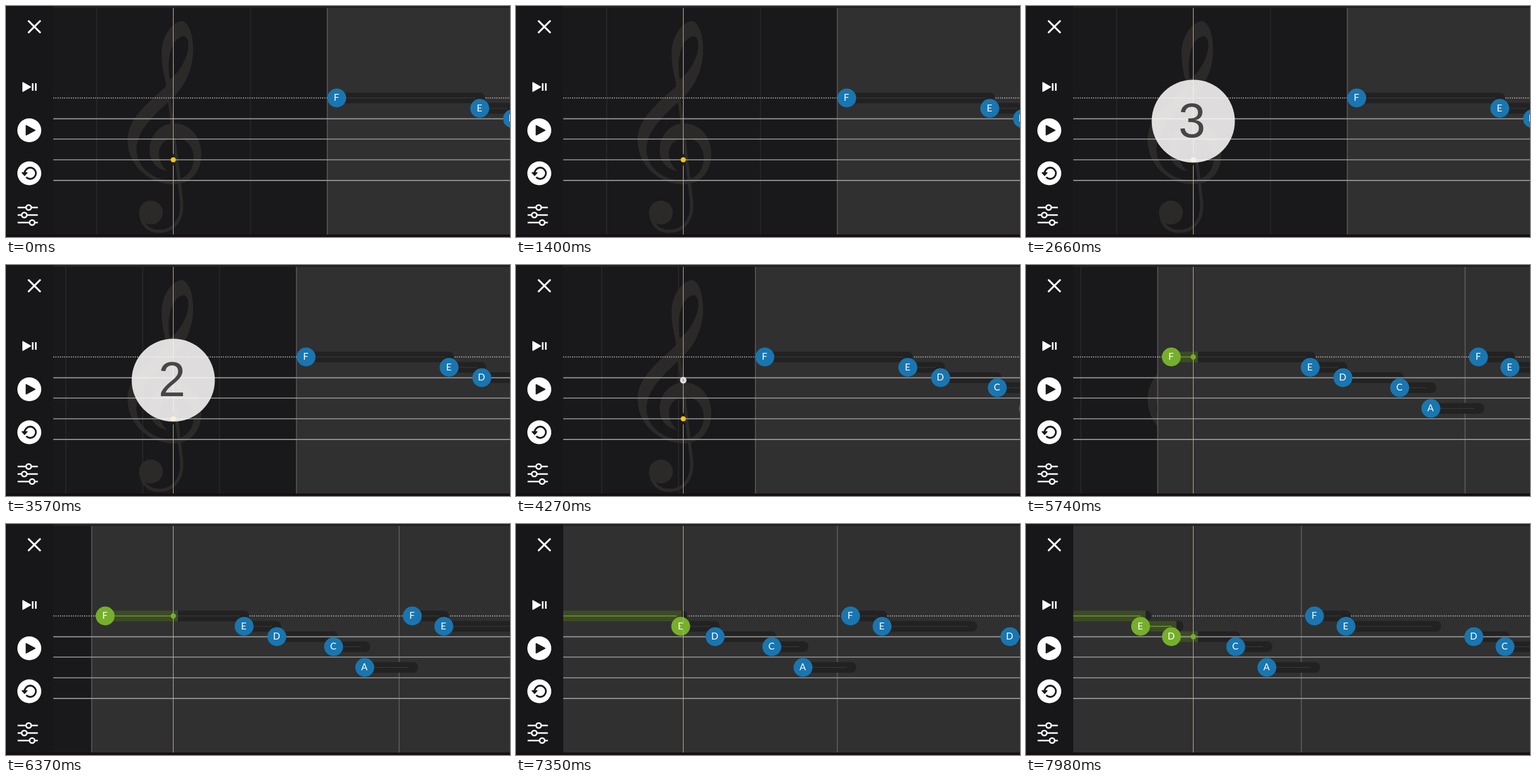
Write an HTML page with a canvas that moves like this. It is 800 px wide and 368 px high and loops after 8 s.

```html
<!DOCTYPE html>
<html lang="en">
<head>
<meta charset="utf-8">
<title>Sing along</title>
<style>
  html, body { margin: 0; width: 100%; height: 100%; overflow: hidden; background: #18181a; }
  canvas { display: block; }
</style>
</head>
<body>
<canvas id="stage" width="800" height="368"></canvas>
<script>
const ctx = document.getElementById('stage').getContext('2d');
const LOOP = 8000, STEP = 70;
const LEFT = 75, TOP = 3, BOTTOM = 364;
const HEAD_X = 265, BAR = 488, BEAT = 122;
const START = 3151, SPEED = 0.1162, BEAT_MS = BEAT / SPEED;
const BLUE = '#1976b0', GREEN = '#76af2b', WHITE = '#fff', DARK = '#19191b';
const PITCH = { F: 146.5, E: 163, D: 179.5, C: 195.5, A: 228.5 };

// x and end are measured from the first bar line; from and to mark the sung part
const notes = [
  { name: 'F', x: 15, end: 250, from: 21.5, to: 233 },
  { name: 'E', x: 242, end: 301, from: 233, to: 282 },
  { name: 'D', x: 294, end: 391, from: 282, to: 372 },
  { name: 'C', x: 384, end: 442 },
  { name: 'A', x: 433.5, end: 518 },
  { name: 'F', x: 509, end: 567 },
  { name: 'E', x: 559, end: 710 },
  { name: 'D', x: 762, end: 819 },
  { name: 'C', x: 811.5, end: 900 }
];

const clef = new Path2D(`M279 24C290 26 297 45 297 70C297 100 285 125 267 144
  C240 170 208 195 207 228C207 256 232 278 264 278C285 277 298 262 298 242
  C298 226 288 211 270 210C256 210 246 217 243 230C241 242 246 254 256 263
  C240 260 228 248 228 230C228 206 244 187 268 187C292 188 310 208 310 236
  C310 262 295 284 266 284C228 284 194 255 193 215C192 180 225 155 255 127
  C251 110 247 95 247 75C247 50 262 26 279 24Z
  M281 48C264 51 254 82 260 117C282 101 294 68 288 53C286 49 284 48 281 48Z`);
const stem = new Path2D('M256 122L272 255L278 306C283 340 266 359 243 359C226 359 214 347 214 330');

function smooth(a, b, v) {
  const u = Math.min(1, Math.max(0, (v - a) / (b - a)));
  return u * u * (3 - 2 * u);
}

function rect(x, y, w, h, color) {
  ctx.fillStyle = color;
  ctx.fillRect(x, y, w, h);
}

function disc(x, y, r, color) {
  ctx.fillStyle = color;
  ctx.beginPath();
  ctx.arc(x, y, r, 0, 7);
  ctx.fill();
}

function line(x1, y1, x2, y2, color, width = 1) {
  ctx.strokeStyle = color;
  ctx.lineWidth = width;
  ctx.beginPath();
  ctx.moveTo(x1, y1);
  ctx.lineTo(x2, y2);
  ctx.stroke();
}

function triangle(x1, y1, x2, y2, x3, y3, color) {
  ctx.fillStyle = ctx.strokeStyle = color;
  ctx.lineWidth = 1.5;
  ctx.lineJoin = 'round';
  ctx.beginPath();
  ctx.moveTo(x1, y1);
  ctx.lineTo(x2, y2);
  ctx.lineTo(x3, y3);
  ctx.closePath();
  ctx.fill();
  ctx.stroke();
}

function drawClef() {
  ctx.fillStyle = ctx.strokeStyle = '#2c2a29';
  ctx.lineWidth = 5;
  ctx.fill(clef, 'evenodd');
  ctx.stroke(stem);
  disc(230, 329, 19, '#2c2a29');
}

function drawBackground(bar) {
  rect(0, 0, 800, 368, DARK);
  for (let k = 1; k < 4; k++) rect(Math.round(bar - k * BEAT) - 0.5, TOP, 1, BOTTOM - TOP, '#313133');
  drawClef();
  rect(bar, TOP, 800 - bar, BOTTOM - TOP, '#303030');
  for (const x of [bar, bar + BAR]) rect(Math.round(x) - 0.5, TOP, 1, BOTTOM - TOP, '#757575');
  rect(LEFT, 0, 725, TOP, '#222223');
  rect(0, BOTTOM, 800, 4, '#170f12');
}

function drawTail(n, bar, now) {
  const y = PITCH[n.name], x = bar + n.x, end = bar + n.end;
  ctx.fillStyle = '#222223';
  ctx.beginPath();
  ctx.roundRect(x, y - 8.5, end - x, 17, [0, 8, 8, 0]);
  ctx.fill();
  line(x, y, end - 15, y, '#39393a');
  if (now > n.from) {
    const a = bar + n.from, b = bar + Math.min(now, n.to);
    rect(a, y - 8.5, b + 8 - a, 17, '#3c4b24');
    line(a, y, b, y, '#6d9933', 1.5);
  }
}

function drawHead(n, bar, now) {
  const y = PITCH[n.name], sung = now > n.from;
  const shift = sung ? (n.from - n.x) * smooth(0, 240, (now - n.from) / SPEED) : 0;
  const x = bar + n.x + shift;
  disc(x, y, 15, sung ? GREEN : BLUE);
  ctx.fillStyle = WHITE;
  ctx.font = '15px Lato, sans-serif';
  ctx.fillText(n.name, x - 0.5, y + 4.5);
}

function drawStaff() {
  for (const y of [179.7, 212, 245, 277.8]) line(LEFT, y, 800, y, '#979797', 1.7);
}

function drawPlayhead(t, now) {
  const color = '#d3a659', idle = t < 4700;
  if (idle) {
    line(HEAD_X + 0.5, TOP, HEAD_X + 0.5, 236, color);
    line(HEAD_X + 0.5, 254, HEAD_X + 0.5, BOTTOM, color);
    disc(HEAD_X + 0.5, 245, 4, '#ffc60a');
    return;
  }
  line(HEAD_X + 0.5, TOP, HEAD_X + 0.5, BOTTOM, color);
  const n = notes.find(n => now > n.from && now <= n.to);
  if (n) disc(HEAD_X + 0.5, PITCH[n.name], 4.2, GREEN);
}

// One pulse per beat: 3, 2, 1
function drawCountdown(t) {
  const since = t - (START - BEAT_MS), beat = Math.floor(since / BEAT_MS);
  if (beat < 0 || beat > 2) return;
  const phase = since - beat * BEAT_MS;
  const scale = smooth(0, 400, phase) - smooth(770, 925, phase);
  if (scale <= 0) return;
  ctx.save();
  ctx.translate(HEAD_X + 0.5, 183.5);
  ctx.scale(scale, scale);
  disc(0, 0, 66, 'rgba(252,250,250,0.87)');
  ctx.fillStyle = '#464646';
  ctx.font = '77px "Liberation Sans", Arial, sans-serif';
  ctx.fillText(3 - beat, -2, 25);
  ctx.restore();
}

function drawSidebar() {
  rect(0, 0, LEFT, BOTTOM, '#17171a');
  ctx.lineCap = 'round';
  line(36, 24, 54, 42, WHITE, 3);
  line(54, 24, 36, 42, WHITE, 3);
  ctx.lineCap = 'butt';

  triangle(26.7, 122, 26.7, 136, 39, 129, WHITE);
  rect(41, 123, 2.6, 12, WHITE);
  rect(46, 123, 2.6, 12, WHITE);

  disc(37, 198, 19, WHITE);
  triangle(32, 190.5, 32, 205.5, 46, 198, DARK);

  disc(37, 266.5, 19, WHITE);
  ctx.strokeStyle = DARK;
  ctx.lineWidth = 2.8;
  ctx.beginPath();
  ctx.arc(38.5, 266.5, 9, -Math.PI, Math.PI * 0.75);
  ctx.stroke();
  triangle(25.5, 265.5, 33.5, 265.5, 29.5, 270, DARK);

  [[36, 321], [29, 333], [41.5, 345]].forEach(([x, y]) => {
    line(18.5, y, 50.5, y, WHITE, 2.6);
    disc(x, y, 5.3, WHITE);
    disc(x, y, 2.8, DARK);
  });
}

function draw(t) {
  const bar = 510 - Math.max(0, t - START) * SPEED;
  const now = HEAD_X - bar;
  ctx.textAlign = 'center';
  drawBackground(bar);
  ctx.setLineDash([1.6, 1.9]);
  line(LEFT, 146.5, 800, 146.5, '#c4c4c4', 1.6);
  ctx.setLineDash([]);
  notes.forEach(n => drawTail(n, bar, now));
  drawStaff();
  notes.forEach(n => drawHead(n, bar, now));
  drawPlayhead(t, now);
  drawCountdown(t);
  drawSidebar();
}

const begin = performance.now();
function tick() {
  const t = (performance.now() - begin) % LOOP;
  draw(Math.floor(t / STEP) * STEP);
  requestAnimationFrame(tick);
}
tick();
</script>
</body>
</html>
```
